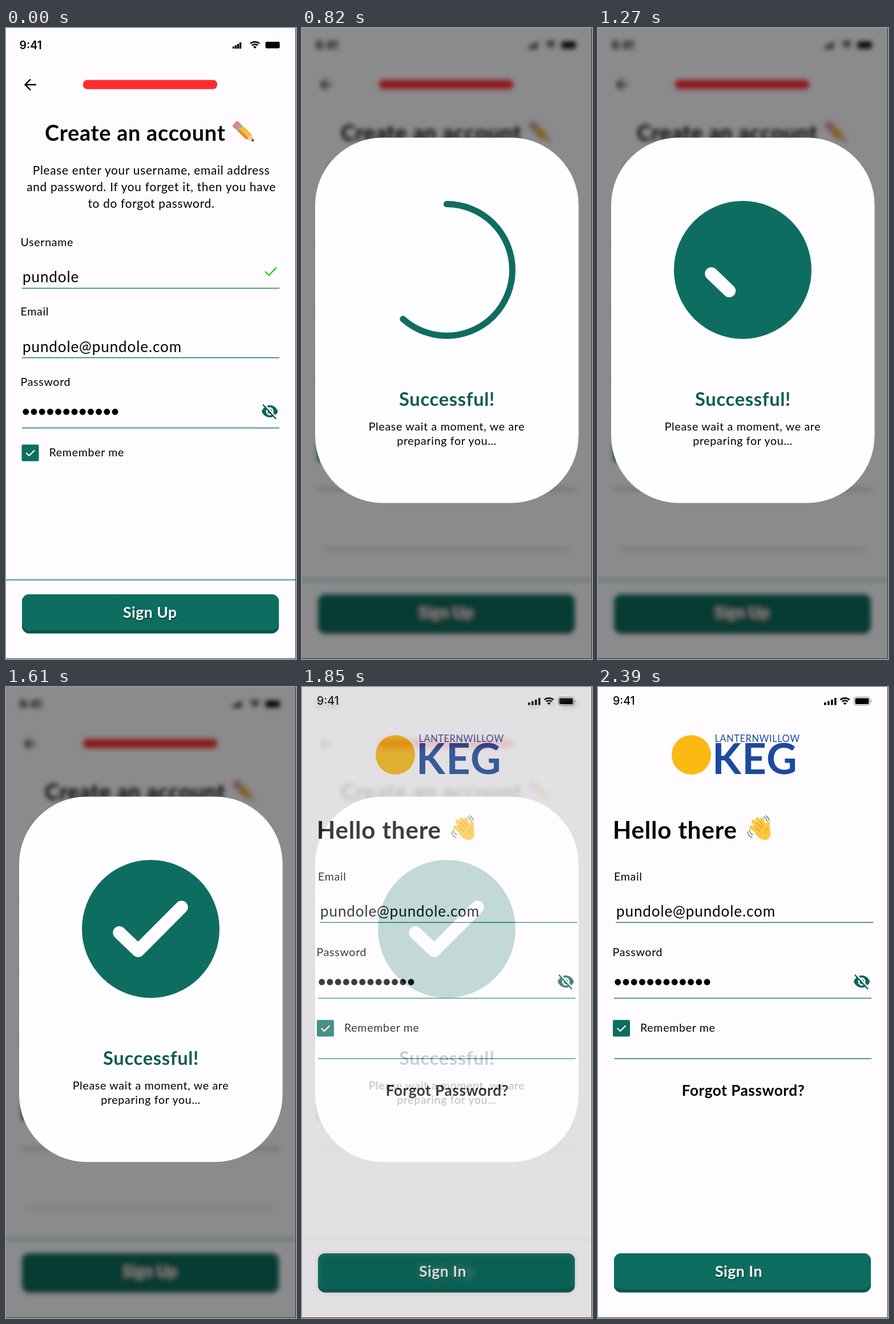
An HTML page that plays this animation: 508x1102 px, repeating every 2420 ms.

```html
<!DOCTYPE html>
<html lang="en">
<head>
<meta charset="utf-8">
<title>Account sign-up flow</title>
<style>
  html, body { margin: 0; width: 100%; height: 100%; overflow: hidden; background: #fefcff; }
  svg { display: block; width: 508px; height: 1102px; }
  text { font-family: Lato, "Open Sans", sans-serif; font-size: 19.6px; letter-spacing: .035em; }
  .mid { text-anchor: middle; }
  .intro { font-size: 20.8px; }
  .input { font-size: 26px; }
  .bold { font-weight: 700; letter-spacing: .02em; }
  .clock { font-family: Inter, sans-serif; letter-spacing: 0; }
  .btn { font-size: 26.5px; fill: #fff; filter: drop-shadow(1px 2px 1px #0006); }
  .rule { stroke: #1b8072; stroke-width: 1.5; }
  .pen { fill: none; stroke: #000; stroke-linecap: round; stroke-linejoin: round; }
  .page { fill: #fefcff; width: 508px; height: 1102px; }
</style>
</head>
<body>
<svg viewBox="0 0 508 1102">
  <defs>
    <filter id="blur" x="-5%" y="-5%" width="110%" height="110%"><feGaussianBlur stdDeviation="4.5"/></filter>
    <g id="wifi" transform="scale(1 .92)">
      <path class="pen" style="stroke-linecap:butt" stroke-width="2.8" d="M-8-3.4a11.5 11.5 0 0 1 16 0M-5 .2a7.2 7.2 0 0 1 10 0"/>
      <path d="M-2.8 3a4 4 0 0 1 5.6 0L0 6.2z"/>
    </g>
    <path id="dots" class="pen" stroke-width="11" stroke-dasharray="0 14.2" d="M34.8 0h156.5"/>
    <path id="eye" fill="#0b6558" transform="translate(446.6 -17.5) scale(1.29 1.41)" d="M12 7c2.76 0 5 2.24 5 5 0 .65-.13 1.26-.36 1.83l2.92 2.92c1.51-1.26 2.7-2.89 3.43-4.75-1.73-4.39-6-7.5-11-7.5-1.4 0-2.74.25-3.98.7l2.16 2.16C10.74 7.13 11.35 7 12 7zM2 4.27l2.74 2.74C3.08 8.3 1.78 10.02 1 12c1.73 4.39 6 7.5 11 7.5 1.55 0 3.03-.3 4.38-.84L19.73 22 21 20.73 3.27 3zM7.53 9.8l1.55 1.55c-.05.21-.08.43-.08.65 0 1.66 1.34 3 3 3 .22 0 .44-.03.65-.08l1.55 1.55c-.67.33-1.41.53-2.2.53-2.76 0-5-2.24-5-5 0-.79.2-1.53.53-2.2zm4.31-.78l3.15 3.15.02-.16c0-1.66-1.34-3-3-3z"/>
    <g id="remember">
      <rect width="30" height="29" rx="2.5" fill="#0e6d61"/>
      <path class="pen" style="stroke:#fff" stroke-width="2.2" d="M8.5 15l4.5 4.5 9-9"/>
      <text x="48" y="20.5">Remember me</text>
    </g>
    <g id="button">
      <rect x="28" y="989" width="450" height="68.5" rx="12.5" fill="#0a574b"/>
      <rect x="28" y="989" width="450" height="62.5" rx="12.5" fill="#0e6d61"/>
    </g>
  </defs>

  <rect class="page"/>

  <g id="signUp">
    <text class="clock" x="23.5" y="36.5" style="font-size:19.5px;font-weight:600">9:41</text>
    <path d="M397 32h3.2v4h-3.2zM401 30h3.2v6h-3.2zM405 28h3.2v8h-3.2zM409 25h3.2v11h-3.2z"/>
    <use href="#wifi" x="436" y="30.3"/>
    <rect x="454.5" y="24" width="25" height="11.5" rx="2"/>
    <path class="pen" stroke-width="2.4" style="stroke-linecap:butt;stroke-linejoin:miter" d="M53 99H34M43 89.5L33.5 99l9.5 9.5"/>
    <rect x="135" y="90.7" width="235" height="16" rx="7" fill="#ff2d32"/>

    <text class="bold" x="68" y="197" style="font-size:37.8px">Create an account</text>
    <g transform="translate(401 167) rotate(43)">
      <rect x="-1" y="-6.5" width="10" height="13" rx="3" fill="#e0848a"/>
      <path fill="#a0a9ae" d="M7-6.5h6v13H7z"/>
      <path fill="#f6bb38" d="M13-6.5h21v13H13z"/>
      <path fill="#d98f28" d="M13 2h21v4.5H13z"/>
      <path fill="#efcfa2" d="M34-6.5L46 0 34 6.5z"/>
      <path fill="#444" d="M41-2.7L46 0l-5 2.7z"/>
    </g>
    <g class="mid">
      <text class="intro" x="254.5" y="256">Please enter your username, email address</text>
      <text class="intro" x="254.5" y="285">and password. If you forget it, then you have</text>
      <text class="intro" x="254.5" y="313.5">to do forgot password.</text>
    </g>

    <text x="25.5" y="380.5">Username</text>
    <text class="input" x="29" y="444">pundole</text>
    <path class="pen" style="stroke:#16d016" stroke-width="2.3" d="M454.5 426l6 6 12.5-13"/>
    <text x="25.5" y="502">Email</text>
    <text class="input" x="29" y="565.5">pundole@pundole.com</text>
    <text x="25.5" y="624.5">Password</text>
    <use href="#dots" y="670.3"/>
    <use href="#eye" y="670"/>
    <path class="rule" d="M28 454.5h451M28 575.8h451M28 698.5h451M0 963.8h508"/>
    <use href="#remember" x="27.5" y="727.5"/>
    <use href="#button"/>
    <text class="bold btn" x="205" y="1030">Sign Up</text>
  </g>

  <g id="dialog">
    <rect class="page"/>
    <g filter="url(#blur)">
      <use href="#signUp"/>
      <path class="rule" d="M28 806h451"/>
      <path class="pen" style="stroke:#0005" stroke-width="5" d="M40 908h427"/>
      <rect x="26" y="841" width="455" height="66" rx="13" fill="#fefcff"/>
    </g>
    <rect width="508" height="1102" opacity=".45"/>
    <rect x="23" y="191.5" width="461.5" height="638" rx="118" fill="#fefdff"/>
    <path id="ring" class="pen" style="stroke:#0e6d61" pathLength="1"/>
    <path id="tick" class="pen" style="stroke:#fefdff" stroke-width="22.5" pathLength="1" d="M198.5 429l33 31.5 76-76"/>
    <g class="mid">
      <text class="bold" x="254" y="660" fill="#0b5d50" style="font-size:32.7px">Successful!</text>
      <text x="253.5" y="703">Please wait a moment, we are</text>
      <text x="253.5" y="728">preparing for you…</text>
    </g>
  </g>

  <g id="signIn">
    <rect class="page"/>
    <text class="clock" x="26" y="30.5" style="font-size:19.5px;font-weight:500">9:41</text>
    <path d="M396 27h3.6v4.5h-3.6zM402 24.5h3.6v7h-3.6zM408 22h3.6v9.500h-3.6zM414 19h3.6v12.500h-3.6z"/>
    <use href="#wifi" x="432.5" y="25.5"/>
    <rect x="448.5" y="17.5" width="28" height="14.5" rx="4" fill="none" stroke="#888"/>
    <rect x="450.5" y="19.5" width="24" height="10.5" rx="2"/>
    <path fill="#888" d="M478 22.500q3 2.200 0 4.500z"/>

    <circle cx="163.5" cy="118.5" r="34.5" fill="#fcb914"/>
    <g fill="#1c4a9f">
      <text x="204.5" y="95.5" style="font-size:16.4px">LANTERNWILLOW</text>
      <text class="bold" x="200" y="152" style="font-size:74px">KEG</text>
    </g>

    <text class="bold" x="26" y="265" style="font-size:42px">Hello there</text>
    <g class="pen">
      <path style="stroke:#fcc741" stroke-width="6.5" d="M284 256l-15.500-11M286 251l-14-16M290 248l-11-17M294 247l-7-15M297 250l1-12"/>
      <path style="fill:#fcc741;stroke:#fcc741" stroke-width="4" d="M281 247l12-5 6 6q4 12-4 17-10 2-18-10z"/>
      <path style="stroke:#dd982f" stroke-width="1.3" d="M283 252l-10-10M286 247l-9-11M290 244l-7-11M298 246q-6 2-4 10"/>
      <path style="stroke:#777" stroke-width="1.5" d="M290 227q5 2 6 7M294 225q5 3 6 8M262 253q1 7 8 10M265 250q1 6 6 8"/>
    </g>

    <text x="28" y="337.5">Email</text>
    <text class="input" x="32" y="401">pundole@pundole.com</text>
    <text x="25.5" y="469.5">Password</text>
    <use href="#dots" y="515.3"/>
    <use href="#eye" y="515"/>
    <path class="rule" d="M31 411.3h451M28 543.5h451M28 649h451"/>
    <use href="#remember" x="26" y="581.5"/>
    <text class="bold mid" x="254.5" y="714" style="font-size:26.2px">Forgot Password?</text>
    <use href="#button"/>
    <text class="bold btn" x="205" y="1030">Sign In</text>
  </g>

  <path fill="none" stroke="#333" d="M507.5 0v1101.5H0"/>
</svg>
<script>
  const LOOP = 2420, OUTER = 120.5, CX = 253.5, CY = 422.5;
  const [dialog, signIn, ring, tick] =
    ["dialog", "signIn", "ring", "tick"].map(id => document.getElementById(id));
  const progress = (t, from, to) => Math.min(1, Math.max(0, (t - from) / (to - from)));
  const easeOut = p => 1 - (1 - p) ** 1.7;

  function show(node, alpha) {
    node.style.opacity = alpha;
    node.style.display = alpha ? "" : "none";
  }

  function reveal(path, part) {
    path.style.display = part ? "" : "none";
    path.setAttribute("stroke-dasharray", part + " 2");
  }

  // The ring is swept clockwise, then thickens inwards into a disc.
  function drawRing(sweep, fill) {
    const width = 11 + (OUTER - 11) * fill, r = OUTER - width / 2;
    ring.setAttribute("d", `M${CX} ${CY - r}a${r} ${r} 0 0 1 0 ${2 * r}a${r} ${r} 0 0 1 0 ${-2 * r}`);
    ring.setAttribute("stroke-width", width);
    reveal(ring, sweep);
  }

  function draw() {
    const t = performance.now() % LOOP;
    show(dialog, progress(t, 500, 580));
    drawRing(progress(t, 540, 996), progress(t, 1000, 1190));
    reveal(tick, progress(t, 1200, 1450));
    show(signIn, easeOut(progress(t, 1620, 2030)));
    requestAnimationFrame(draw);
  }
  draw();
</script>
</body>
</html>
```
